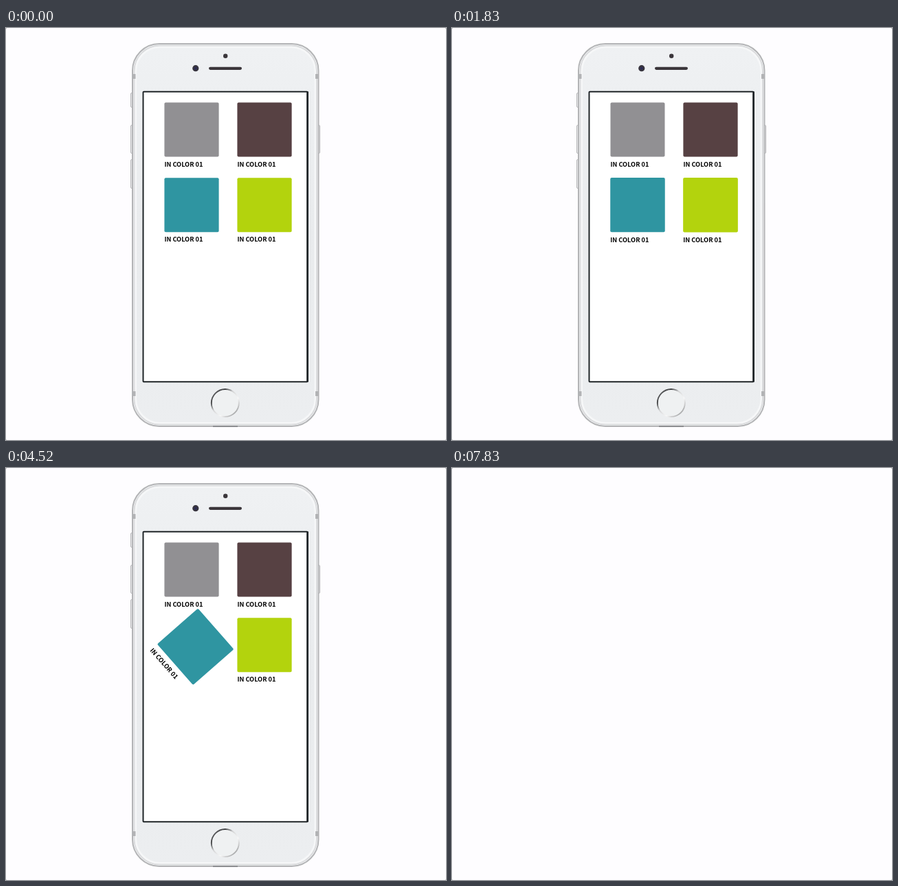
Recreate the animation shown at these times as an HTML page. Size 640 by 600 pixels, loop 8000 ms.

```html
<!DOCTYPE html>
<html lang="en">
<head>
<meta charset="utf-8">
<title>Colour tiles</title>
<style>
  html, body { margin: 0; width: 100%; height: 100%; overflow: hidden; background: #9a9a9c; }
  svg { display: block; width: 640px; height: 600px; background: #fefdff; border-radius: 1.5px; }
  text { font: 700 9.2px "Noto Sans CJK JP", "Noto Sans CJK", "Noto Sans", sans-serif; }
</style>
</head>
<body>
<svg viewBox="0 0 640 600">
  <defs>
    <linearGradient id="body" x1="0" y1="0" x2="0" y2="1">
      <stop offset="0" stop-color="#eff1f3"/>
      <stop offset=".5" stop-color="#e9ebed"/>
      <stop offset="1" stop-color="#eceef0"/>
    </linearGradient>
    <linearGradient id="ring" x1="0" y1="0" x2="1" y2="1">
      <stop offset="0" stop-color="#77787a"/>
      <stop offset=".25" stop-color="#3c3d3f"/>
      <stop offset=".42" stop-color="#d2d3d4"/>
      <stop offset=".65" stop-color="#f8f8f8"/>
      <stop offset="1" stop-color="#77787a"/>
    </linearGradient>
  </defs>
  <g id="phone">
    <g fill="#ececee" stroke="#b4b4b6">
      <rect x="181.5" y="94.5" width="5" height="21" rx="1.5"/>
      <rect x="181.5" y="141.5" width="5" height="41" rx="1.5"/>
      <rect x="181.5" y="191.5" width="5" height="42" rx="1.5"/>
      <rect x="451.5" y="141.5" width="5" height="41" rx="1.5"/>
    </g>
    <rect x="184" y="23" width="270.5" height="557" rx="39" fill="#f6f7f8" stroke="#b3b4b6" stroke-width="2"/>
    <rect x="186.5" y="25.5" width="265.5" height="552" rx="37" fill="none" stroke="#dadbdd" stroke-width="2"/>
    <rect x="190" y="29" width="258.5" height="545" rx="34" fill="url(#body)"/>
    <g fill="#b2b3b5">
      <rect x="183.5" y="67" width="5" height="7"/>
      <rect x="450" y="67" width="5" height="7"/>
      <rect x="183.5" y="529" width="5" height="7"/>
      <rect x="450" y="529" width="5" height="7"/>
      <rect x="301" y="579.3" width="36" height="1.8" fill="#858689"/>
    </g>
    <circle cx="319.2" cy="40.8" r="3.2" fill="#3b363b"/>
    <circle cx="275.8" cy="58.7" r="4.6" fill="#37343f"/>
    <circle cx="275.8" cy="58.7" r="2" fill="#2c2b55"/>
    <rect x="295" y="56.7" width="48" height="4.2" rx="2.1" fill="#3b363b"/>
    <rect x="199.5" y="92.8" width="239" height="422.4" rx="1" fill="#fff" stroke="#1f2427" stroke-width="2"/>
    <path d="M438.6 92.5V515.5" stroke="#1f2427" stroke-width="2.6"/>
    <circle cx="318.8" cy="546" r="20" fill="#eff1f2" stroke="url(#ring)" stroke-width="1.8"/>
    <g id="tiles"></g>
  </g>
</svg>
<script>
  const LOOP = 8000, CYCLE = 7260, ENTER = 740;
  const GROW = 220, SPIN = 1000;
  const FADE_IN = [0, 260], FADE_OUT = [6560, 7090];

  const phone = document.getElementById('phone');
  const layer = document.getElementById('tiles');

  const clamp = v => Math.min(1, Math.max(0, v));
  const progress = (t, from, to) => clamp((t - from) / (to - from));
  const smooth = v => v * v * (3 - 2 * v);

  const tiles = ['#919093', '#574143', '#2f95a1', '#b3d30d'].map((color, i) => {
    const node = document.createElementNS('http://www.w3.org/2000/svg', 'g');
    node.innerHTML = `<rect x="-39.6" y="-47" width="79.2" height="79" rx="2" fill="${color}"/>
      <text x="-39.6" y="46.3">IN COLOR 01</text>`;
    layer.append(node);
    return {
      node,
      x: 270 + 106 * (i % 2),
      y: 155.5 + 109.7 * (i >> 1),
      land: 282 + 65 * i,
      spin: 1370 + 1090 * i
    };
  });

  // Linear growth followed by a decaying overshoot.
  function tileScale(t, land) {
    if (t < land) return progress(t, land - GROW, land);
    const s = (t - land) / 1000;
    return 1 + 0.055 * Math.sin(4 * Math.PI * s) * Math.exp(-3.5 * s);
  }

  function draw(now) {
    const t = (now % LOOP - ENTER + CYCLE) % CYCLE;
    phone.style.opacity = smooth(progress(t, ...FADE_IN)) * (1 - smooth(progress(t, ...FADE_OUT)));
    for (const { node, x, y, land, spin } of tiles) {
      const angle = 360 * smooth(progress(t, spin, spin + SPIN));
      node.setAttribute('transform',
        `translate(${x} ${y}) rotate(${angle}) scale(${tileScale(t, land)})`);
    }
  }

  const start = performance.now();
  function tick() {
    draw(performance.now() - start);
    requestAnimationFrame(tick);
  }
  tick();
</script>
</body>
</html>
```
